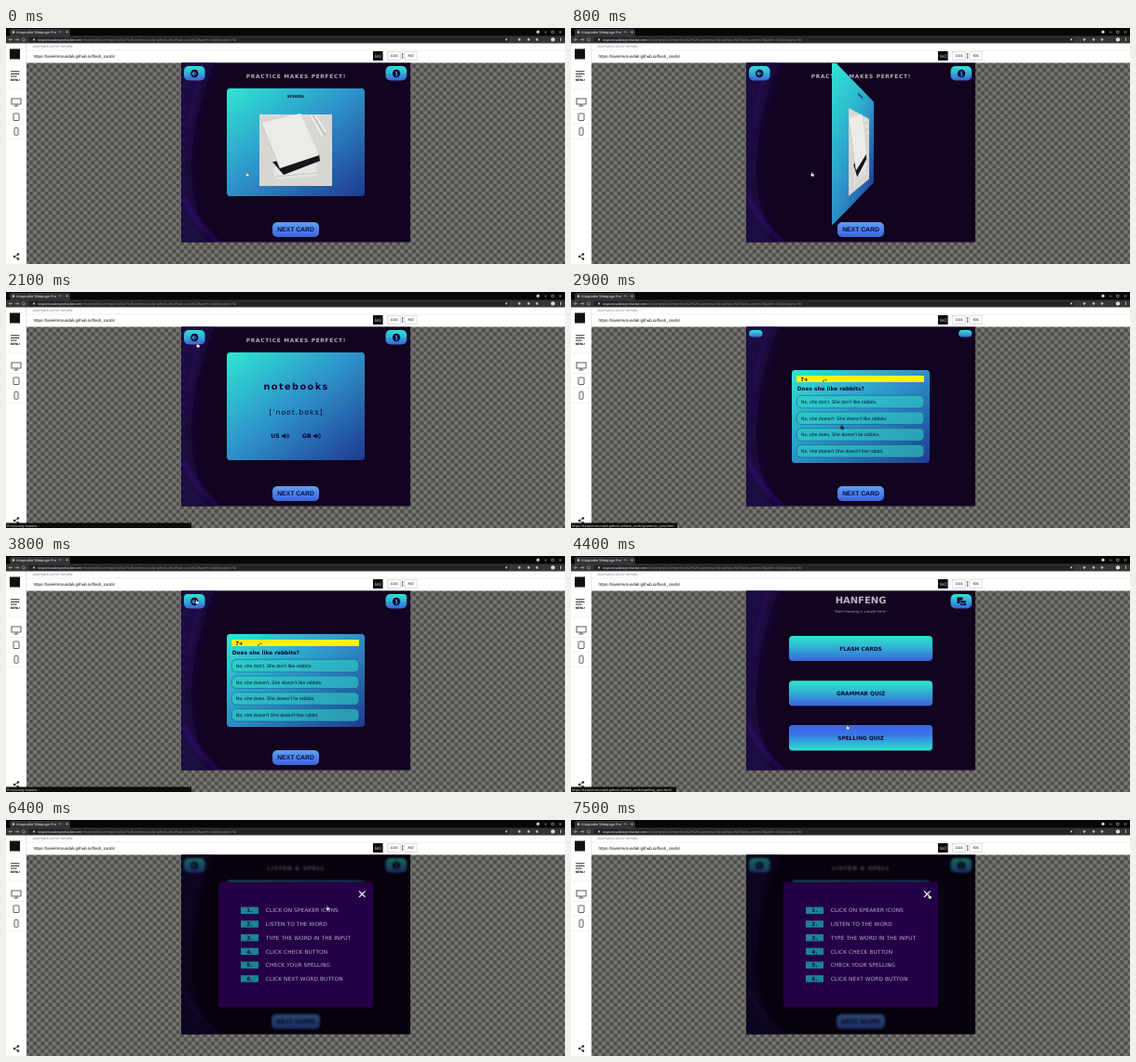
Animation, 600 px wide and 254 px high, one loop 8 s. Source, as an HTML page:

```html
<!DOCTYPE html>
<html lang="en">
<head>
<meta charset="utf-8">
<title>Flash cards demo</title>
<style>
html, body { margin: 0; width: 100%; height: 100%; overflow: hidden; background: #fff; }
#stage { position: relative; width: 600px; height: 254px; overflow: hidden; }
svg { position: absolute; left: 0; top: 0; display: block; }
text { font: 5.8px "DejaVu Sans", sans-serif; text-rendering: geometricPrecision; white-space: pre; }
.b { font-weight: bold; }
.m { text-anchor: middle; }
.ui { font-family: "Noto Sans", sans-serif; font-size: 3.35px; }
.ar { font-family: "Liberation Sans", Arial, sans-serif; font-size: 3.6px; }
.head { font-weight: bold; letter-spacing: .75px; text-anchor: middle; fill: #b4aebf; }
.ink { fill: #0e0430; }
.next { font: bold 6.8px "Liberation Sans", Arial, sans-serif; text-anchor: middle; fill: #0c0a40; }
.opt use { fill: #2fd2c2; fill-opacity: .6; stroke: #145a80; stroke-width: .6; }
.opt text { font: 5.15px "Liberation Sans", Arial, sans-serif; fill: #06123a; }
.rules rect { fill: #1c8494; }
.rules text { fill: #b9abcd; letter-spacing: .1px; }
.rules .n { font-weight: bold; fill: #1b0c48; text-anchor: middle; }
.status rect { fill: #0c0c0d; }
.status text { fill: #ddd; font-size: 3.58px; }

.show { animation: 8s step-end infinite; }
.flash { animation-name: flash; }
.menu { animation-name: menu; }
.quiz { animation-name: quiz; }
.icons { animation-name: icons; }
.spell { animation: spell 8s step-end infinite, blur 8s linear infinite; }
.modal { animation: modal 8s linear infinite; }
.hot1 { animation-name: hot1; }
.hot2 { animation-name: hot2; }
.hot3 { animation-name: hot3; }
.link2 { animation-name: link2; }
.wait { animation-name: wait; }
.cursor { animation: move 8s linear infinite, shade 8s step-end infinite; }

.flip { position: absolute; left: 237px; top: 65px; width: 148px; height: 116px;
  perspective: 196px; clip-path: inset(-27px -60px -60px); }
.card { position: absolute; inset: 0; transform-style: preserve-3d; animation: turn 8s infinite; }
.card svg { backface-visibility: hidden; }
.card .back { transform: rotateY(180deg); }

@keyframes turn {
  0% { transform: rotateY(0); }
  7.5% { transform: rotateY(0); animation-timing-function: ease; }
  17.5%, to { transform: rotateY(180deg); }
}
@keyframes flash { 0% { opacity: 1 } 27.5%, to { opacity: 0 } }
@keyframes menu { 0% { opacity: 0 } 27.5% { opacity: 1 } 35% { opacity: 0 } 48.75% { opacity: 1 } 58.75%, to { opacity: 0 } }
@keyframes quiz { 0% { opacity: 0 } 35% { opacity: 1 } 48.75%, to { opacity: 0 } }
@keyframes icons { 0% { opacity: 0 } 37.5%, to { opacity: 1 } }
@keyframes spell { 0% { opacity: 0 } 58.75%, to { opacity: 1 } }
@keyframes blur { 0%, 75% { filter: none } 77.5%, to { filter: blur(1.3px) } }
@keyframes modal { 0%, 75% { opacity: 0 } 77.5%, to { opacity: 1 } }
@keyframes hot1 { 0% { opacity: 0 } 28.75% { opacity: 1 } 31.25% { opacity: 0 } 51.25% { opacity: 1 } 52.5%, to { opacity: 0 } }
@keyframes hot2 { 0% { opacity: 0 } 31.25% { opacity: 1 } 35% { opacity: 0 } 52.5% { opacity: 1 } 53.75%, to { opacity: 0 } }
@keyframes link2 { 0% { opacity: 0 } 31.25% { opacity: 1 } 41.25% { opacity: 0 } 52.5% { opacity: 1 } 53.75%, to { opacity: 0 } }
@keyframes hot3 { 0% { opacity: 0 } 53.75% { opacity: 1 } 68.75%, to { opacity: 0 } }
@keyframes wait { 0% { opacity: 0 } 25% { opacity: 1 } 27.5% { opacity: 0 } 46.25% { opacity: 1 } 48.75%, to { opacity: 0 } }
@keyframes shade { 0% { fill: #fff } 35% { fill: #33202c } 41.25%, to { fill: #fff } }
@keyframes move {
  0%, 17.5% { transform: translate(258px, 155px) }
  23.75% { transform: translate(203px, 48px) }
  25%, 27.5% { transform: translate(205px, 55px) }
  28.75% { transform: translate(262px, 104px) }
  31.25%, 41.25% { transform: translate(290px, 143px) }
  45%, 48.75% { transform: translate(204px, 47px) }
  51.25% { transform: translate(270px, 100px) }
  52.5% { transform: translate(285px, 140px) }
  55%, 63.75% { transform: translate(296px, 182px) }
  66.25%, 67.5% { transform: translate(378px, 75px) }
  71.25%, 75% { transform: translate(419px, 47px) }
  78.75% { transform: translate(335px, 94px) }
  86.25%, 87.5% { transform: translate(391px, 85px) }
  91.25%, to { transform: translate(384px, 80px) }
}
</style>
</head>
<body>
<div id="stage">

<svg width="600" height="254">
  <defs>
    <pattern id="check" x="58" y="118" width="8.3" height="8.3" patternUnits="userSpaceOnUse">
      <rect width="8.3" height="8.3" fill="#777673"/>
      <path d="M0 0h4.15v4.15h-4.15zM4.15 4.15h4.15v4.15h-4.15z" fill="#4e4e4c"/>
    </pattern>
    <linearGradient id="cool" x2="0" y2="1">
      <stop stop-color="#2fe4cf"/><stop offset=".45" stop-color="#31b3d4"/><stop offset="1" stop-color="#3a62da"/>
    </linearGradient>
    <linearGradient id="warm" x2="0" y2="1">
      <stop stop-color="#3a62e6"/><stop offset=".35" stop-color="#3a74e6"/><stop offset="1" stop-color="#2fe4cf"/>
    </linearGradient>
    <linearGradient id="blue" x2="0" y2="1">
      <stop stop-color="#5fa0f4"/><stop offset="1" stop-color="#3c63dc"/>
    </linearGradient>
    <linearGradient id="sea" x2="1" y2="1">
      <stop stop-color="#2fe6d2"/><stop offset=".5" stop-color="#2d8fca"/><stop offset="1" stop-color="#1f3a8f"/>
    </linearGradient>
    <filter id="soft" x="-50%" y="-50%" width="200%" height="200%"><feGaussianBlur stdDeviation="6"/></filter>
    <filter id="haze" x="-50%" y="-50%" width="200%" height="200%"><feGaussianBlur stdDeviation="2"/></filter>
    <clipPath id="view"><rect x="188" y="37.5" width="246" height="193"/></clipPath>

    <rect id="pill" width="22.6" height="15.5" rx="5" fill="url(#cool)"/>
    <g id="backIcon">
      <circle r="4.2" fill="#0d0a35"/>
      <path d="M2.4 0H-2M0-2.2L-2.2 0 0 2.2" fill="none" stroke="#37a5d6" stroke-width="1.1"/>
    </g>
    <g id="infoIcon">
      <circle r="4.2" fill="#0d0a35"/>
      <path d="M-.9-.6H.3V2M-1.2 2.2H1.3M0-2.7v1.2" fill="none" stroke="#37a5d6" stroke-width="1.1"/>
    </g>
    <g id="nav">
      <use href="#pill" x="191" y="41"/><use href="#pill" x="407.5" y="41"/>
      <use href="#backIcon" x="202.3" y="49"/><use href="#infoIcon" x="419" y="49"/>
    </g>
    <g id="sound">
      <path d="M0 2h1.6L3.7.2v5.6L1.6 4H0z" fill="#0e0430"/>
      <path d="M4.5 2q1 1 0 2M5.3 1q2 2 0 4M6-.1q3.2 3.1 0 6.2" fill="none" stroke="#0e0430" stroke-width=".65"/>
    </g>
    <g id="nextCard">
      <rect x="286" y="209" width="50" height="16" rx="5" fill="url(#blue)"/>
      <text class="next" x="311" y="219.4">NEXT CARD</text>
    </g>
    <rect id="wide" x="234" width="154" height="27" rx="4"/>
    <rect id="answer" x="242.3" width="136.6" height="13.6" rx="5"/>
  </defs>

  <!-- browser -->
  <rect width="600" height="17" fill="#070707"/>
  <rect x="4" y="1" width="65" height="8" rx="2" fill="#333336"/>
  <rect y="8.5" width="600" height="8" fill="#363639"/>
  <rect x="24" y="9.7" width="516" height="5.8" rx="2.9" fill="#232427"/>
  <circle cx="8" cy="4.5" r="1.3" fill="#ccc"/>
  <text class="ui" x="11" y="5.6" fill="#e4e4e4" style="font-size:3.8px">Adaptable Webpage Pre</text>
  <path d="M57 3.3l2 2m0-2l-2 2M64 4.3h3m-1.5-1.5v3M3 12.5h4M5 10.8L3.3 12.5 5 14.2M10 12.5h4M12 10.8l1.7 1.7-1.7 1.7" fill="none" stroke="#bbb" stroke-width=".6"/>
  <circle cx="19" cy="12.5" r="1.5" fill="none" stroke="#bbb" stroke-width=".6"/>
  <rect x="29" y="11.5" width="2" height="2" rx=".4" fill="#bbb"/>
  <text class="ui" x="34" y="13.7" fill="#999"><tspan fill="#f2f2f2">responsivedesignchecker.com</tspan>/checker.php?url=https%3A%2F%2Ftavielmorundali.github.io%2Fflash_cards%2F&amp;width=1400&amp;height=700</text>
  <circle cx="571" cy="4.2" r="1.6" fill="#ddd"/>
  <path d="M578 4.4h2.4M593.8 3.2l2.4 2.4m0-2.4l-2.4 2.4" stroke="#ccc" stroke-width=".6"/>
  <rect x="585.8" y="3.2" width="2.2" height="2.2" fill="none" stroke="#ccc" stroke-width=".5"/>
  <g fill="#bbb">
    <circle cx="537" cy="12.4" r="1.1"/><circle cx="551" cy="12.4" r="1.3"/><circle cx="561" cy="12.4" r="1.3"/>
    <circle cx="570" cy="12.4" r="1.3"/><circle cx="587" cy="12.4" r="2.2" fill="#d8d4c8"/>
    <rect x="595" y="10.6" width="1" height="3.6"/>
  </g>

  <!-- tool header and sidebar -->
  <rect y="16.4" width="600" height="238" fill="#fff"/>
  <path d="M22 24h578" stroke="#e8e2e6" stroke-width=".6"/>
  <rect x="22" y="37.5" width="578" height="217" fill="url(#check)"/>
  <path d="M21.7 16.4V254" stroke="#ccc" stroke-width=".5"/>
  <text class="ui" x="28.5" y="21.4" fill="#777" style="font-size:3.1px">ADAPTABLE LAYOUT PREVIEW</text>
  <text class="ar" x="29.5" y="31.6" fill="#111" style="font-size:4.5px">https://tavielmorundali.github.io/flash_cards/</text>
  <rect x="394" y="25" width="10.5" height="10" fill="#000"/>
  <text class="ar m" x="399.2" y="31.7" fill="#fff" style="font-size:4.8px">GO</text>
  <g fill="#fff" stroke="#ccc" stroke-width=".6">
    <rect x="409.5" y="25.3" width="14" height="9.4"/><rect x="428" y="25.3" width="13" height="9.4"/>
  </g>
  <text class="ar m" x="416.5" y="31.4">1024</text>
  <text class="ar m" x="434.5" y="31.4">800</text>
  <path d="M425.7 27.5v5m-.9-4.1l.9-1 .9 1m-1.8 3.2l.9 1 .9-1" fill="none" stroke="#222" stroke-width=".6"/>

  <rect x="4" y="22.5" width="11" height="11" fill="#111"/>
  <path d="M5 46.800h9.500M5 49.400h9.500M5 52h6.500" stroke="#111" stroke-width=".9"/>
  <text class="ar b m" x="9.7" y="57.2" style="font-size:3.4px">MENU</text>
  <path d="M1 66h20M1 87.500h20M1 103.500h20M1 119.500h20" stroke="#e4e4e4" stroke-width=".5"/>
  <g fill="none" stroke="#333" stroke-width=".8">
    <rect x="6" y="76" width="10" height="6"/><path d="M11 82v1.8M8.500 84h5"/>
    <rect x="8" y="92" width="6" height="7.5" rx=".8"/>
    <rect x="9" y="107.5" width="4" height="7.8" rx=".8"/>
    <path d="M13 243.500L9 246l4 2.500"/>
  </g>
  <g fill="#222"><circle cx="13" cy="243.5" r="1.2"/><circle cx="9" cy="246" r="1.2"/><circle cx="13" cy="248.5" r="1.2"/></g>

  <!-- page backdrop -->
  <g clip-path="url(#view)">
    <rect x="188" y="37" width="246" height="194" fill="#12031f"/>
    <path d="M180 30H226Q206 80 200 130T222 240H180z" fill="#1c0742" filter="url(#soft)"/>
    <path d="M190 182Q200 206 232 236" fill="none" stroke="#3c0c86" stroke-width="5" opacity=".5" filter="url(#haze)"/>
    <path d="M214 36Q192 90 199 140" fill="none" stroke="#2a0a60" stroke-width="4" opacity=".5" filter="url(#haze)"/>
  </g>
</svg>

<!-- flash cards -->
<svg class="show flash" width="600" height="254">
  <use href="#nav"/>
  <text class="head" x="311.4" y="53.6">PRACTICE MAKES PERFECT!</text>
  <use href="#nextCard"/>
</svg>
<div class="flip show flash">
  <div class="card">
    <svg width="148" height="116">
      <rect width="148" height="116" rx="3.5" fill="url(#sea)"/>
      <text class="b m ink" x="74" y="9.8" style="font-size:4px">SCHOOL</text>
      <rect x="35" y="28" width="78" height="77" fill="#d8d6d2"/>
      <path d="M50 84l46-4 2 14-46 4z" fill="#e6e4e1"/>
      <path d="M52 95l46-4" stroke="#b9b7b5" stroke-width=".7"/>
      <path d="M49 79l50-8 1 7-39 15z" fill="#15151c"/>
      <path d="M37 37l42-10 20 45-42 14z" fill="#ecebe8"/>
      <path d="M37 37l20 49" stroke="#c4c2be" stroke-width=".7"/>
      <path d="M90 29l13 23M95 29l11 18" stroke="#f0efed" stroke-width="1.6"/>
      <path d="M92.500 29l13 21" stroke="#9d9b9b" stroke-width=".6"/>
    </svg>
    <svg class="back" width="148" height="116">
      <rect width="148" height="116" rx="3.5" fill="url(#sea)"/>
      <text class="b m ink" x="74.7" y="40" style="font-size:9.63px;letter-spacing:1.5px">notebooks</text>
      <text class="m ink" x="74.4" y="67" style="font-size:7.7px;letter-spacing:1px">[ˈnoʊt.bʊks]</text>
      <text class="b ink" x="47.3" y="92.3" style="font-size:6.2px">US</text>
      <use href="#sound" x="59" y="87"/>
      <text class="b ink" x="81" y="92.3" style="font-size:6.2px">GB</text>
      <use href="#sound" x="93" y="87"/>
    </svg>
  </div>
</div>

<!-- menu -->
<svg class="show menu" width="600" height="254">
  <text class="b m" x="311" y="51" fill="#b9b3c6" style="font-size:10px">HANFENG</text>
  <text class="m" x="311" y="60.6" fill="#a29bb2" style="font-size:3.86px">Rote-learning is simple here!</text>
  <use href="#pill" x="407.5" y="41"/>
  <path d="M414.500 44.500h6v3h-3v3.500h-3zM418 48.200h6v1.300l-3 1.500-3-1.500zM418 50.400l3 1.500 3-1.500v2.600h-6z" fill="#0d0a35"/>
  <use href="#wide" y="86" fill="url(#cool)"/>
  <use href="#wide" y="134.3" fill="url(#cool)"/>
  <use href="#wide" y="182.3" fill="url(#cool)"/>
  <use class="show hot1" href="#wide" y="86" fill="url(#warm)"/>
  <use class="show hot2" href="#wide" y="134.3" fill="url(#warm)"/>
  <use class="show hot3" href="#wide" y="182.3" fill="url(#warm)"/>
  <text class="b m ink" x="311" y="102">FLASH CARDS</text>
  <text class="b m ink" x="311" y="150.2">GRAMMAR QUIZ</text>
  <text class="b m ink" x="311" y="198.2">SPELLING QUIZ</text>
</svg>

<!-- grammar quiz -->
<svg class="show quiz" width="600" height="254">
  <rect x="191" y="41" width="14.6" height="7.6" rx="3.8" fill="url(#cool)"/>
  <rect x="416" y="41" width="14.4" height="7.6" rx="3.8" fill="url(#cool)"/>
  <use class="show icons" href="#nav"/>
  <rect x="237" y="84" width="148" height="100" rx="3.5" fill="url(#sea)"/>
  <rect x="242.3" y="90" width="136.6" height="7" fill="#fdf500"/>
  <text class="b" x="246.5" y="95.5">?+</text>
  <text class="b" x="270" y="95.5">,-</text>
  <text class="b ink" x="242.8" y="106.2">Does she like rabbits?</text>
  <g class="opt">
    <use href="#answer" y="111.3"/>
    <use href="#answer" y="129"/>
    <use href="#answer" y="146.7"/>
    <use href="#answer" y="164.4"/>
    <text x="246.7" y="119.9">No, she don't. She don't like rabbits.</text>
    <text x="246.7" y="137.6">No, she doesn't. She doesn't like rabbits.</text>
    <text x="246.7" y="155.3">No, she does. She doesn't lie rabbits.</text>
    <text x="246.7" y="173">No, she doesn't She doesn't like rabbit.</text>
  </g>
  <use href="#nextCard"/>
</svg>

<!-- spelling quiz -->
<svg class="spell" width="600" height="254">
  <use href="#nav"/>
  <text class="head" x="311.4" y="53.6">LISTEN &amp; SPELL</text>
  <rect x="237" y="65" width="148" height="116" rx="3.5" fill="url(#sea)"/>
  <text class="b ink" x="281" y="82.4" style="font-size:8px">US</text>
  <use href="#sound" x="296" y="76.5"/>
  <text class="b ink" x="318" y="82.4" style="font-size:8px">GB</text>
  <use href="#sound" x="333" y="76.5"/>
  <rect x="249.4" y="129" width="122.8" height="17" rx="2" fill="#62c8f0" stroke="#101c50"/>
  <text class="m" x="311" y="139.5" fill="#235f92" style="font-size:4.82px;font-style:italic">Type the word(s) you hear</text>
  <rect x="295" y="152.5" width="32" height="14.5" rx="4" fill="url(#blue)"/>
  <text class="next" x="311" y="161.9" style="font-size:5.8px">CHECK</text>
  <rect x="285" y="209" width="52" height="16" rx="5" fill="url(#blue)"/>
  <text class="next" x="311" y="219.4">NEXT WORD</text>
</svg>

<!-- help -->
<svg class="modal" width="600" height="254">
  <rect x="188" y="37.5" width="246" height="193" opacity=".55"/>
  <rect x="228" y="66.5" width="166" height="135" rx="3" fill="#240046"/>
  <path d="M379 76.500l6.500 6.500m0-6.500l-6.500 6.500" stroke="#e8e4ee" stroke-width="1.3"/>
  <g class="rules" id="rules"></g>
</svg>

<!-- status line and pointer -->
<svg class="status" width="600" height="254">
  <g class="show wait"><rect y="248.5" width="199" height="6"/><text class="ui" x="1" y="252.8">Processing request...</text></g>
  <g class="show hot1"><rect y="248.5" width="112" height="6"/><text class="ui" x="1" y="252.8">https://tavielmorundali.github.io/flash_cards/flash_cards.html</text></g>
  <g class="show link2"><rect y="248.5" width="114" height="6"/><text class="ui" x="1" y="252.8">https://tavielmorundali.github.io/flash_cards/grammar_quiz.html</text></g>
  <g class="show hot3"><rect y="248.5" width="113" height="6"/><text class="ui" x="1" y="252.8">https://tavielmorundali.github.io/flash_cards/spelling_quiz.html</text></g>
  <path class="cursor" d="M0 0h.9v1.700l2.100.6-.3 2.500H.4L-1.200 2.700l.5-.5.7.5z" stroke="#222" stroke-width=".35"/>
</svg>
</div>

<script>
const steps = ["CLICK ON SPEAKER ICONS", "LISTEN TO THE WORD", "TYPE THE WORD IN THE INPUT",
  "CLICK CHECK BUTTON", "CHECK YOUR SPELLING", "CLICK NEXT WORD BUTTON"];
document.getElementById("rules").innerHTML = steps.map((label, i) => {
  const y = 97.3 + i * 14.7;
  return `<rect x="252" y="${y - 3.7}" width="19" height="7.4"/>
    <text class="n" x="261.5" y="${y + 2.1}">${i + 1}.</text>
    <text x="278.8" y="${y + 2.1}">${label}</text>`;
}).join("");
</script>
</body>
</html>
```
